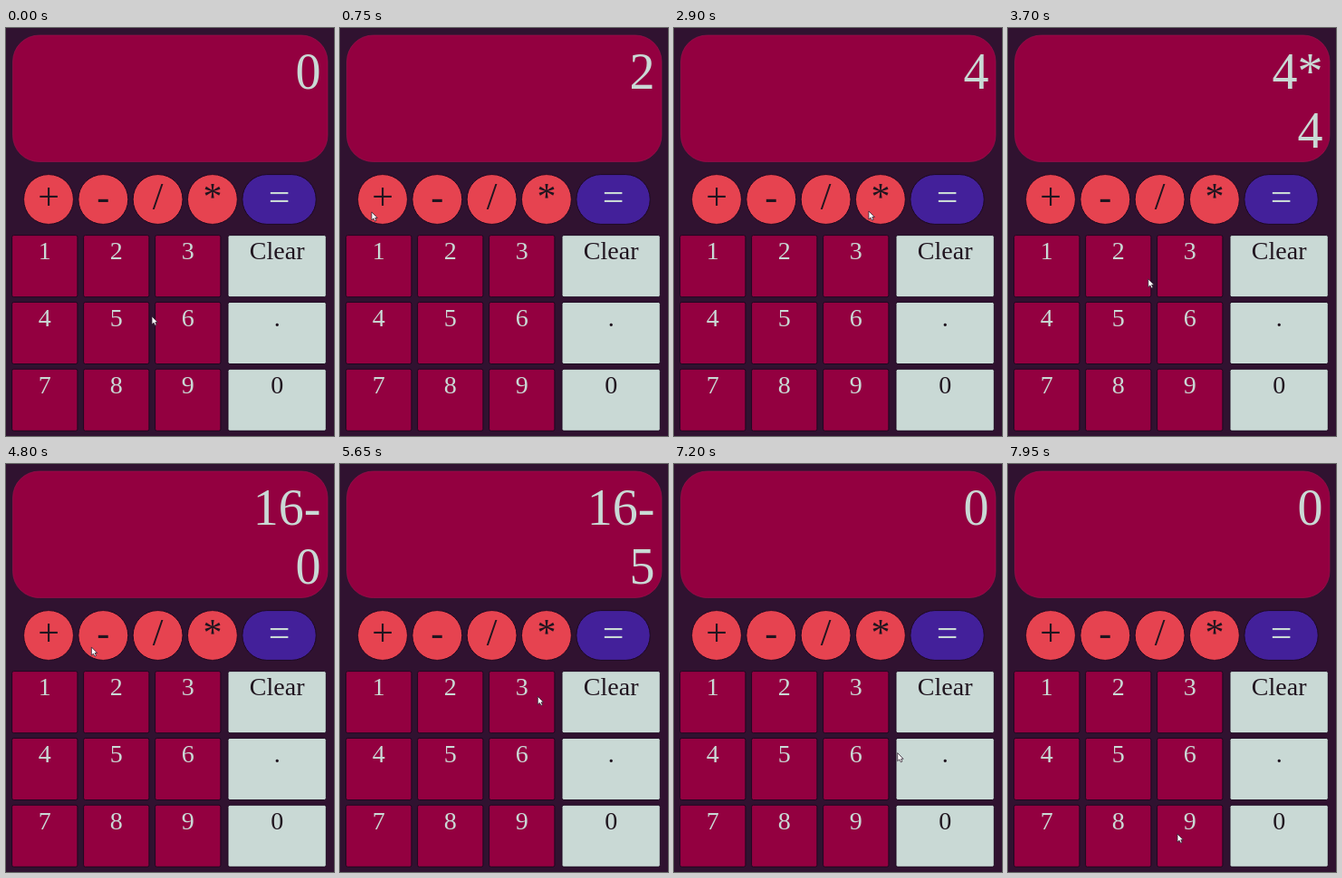
Animation of 362 by 450 pixels, one loop 8000 ms. Source, as an HTML page:

```html
<!DOCTYPE html>
<html lang="en">
<head>
<meta charset="utf-8">
<title>Calculator</title>
<style>
  html, body { margin: 0; width: 100%; height: 100%; overflow: hidden; background: #301230; }
  svg { display: block; width: 100%; height: 100%; }
  text { font-family: "Liberation Serif", "Times New Roman", serif; font-size: 28px; text-anchor: middle; }
  .key { stroke: #1d0820; stroke-width: 1; }
  .light { fill: #c9d9d5; }
  .dark { fill: #20151f; }
  .op { font-size: 42px; }
  .readout { font-size: 56px; text-anchor: end; }
</style>
</head>
<body>
<svg viewBox="0 0 362 450">
  <rect width="362" height="450" fill="#301230"/>
  <rect x="7.5" y="8" width="347.5" height="139.5" rx="29" fill="#930040" stroke="#a3124e" stroke-width=".6"/>
  <text id="upper" class="readout light" x="347.5" y="67"></text>
  <text id="lower" class="readout light" x="347.5" y="131.5"></text>
  <g id="keys"></g>
  <path id="cursor" d="M0 0V9L2.1 7.2L3.6 10.2L5.2 9.4L3.8 6.6H6.4Z" fill="#fff" stroke="#302030" stroke-width=".8"/>
</svg>
<script>
  const LOOP = 8000;
  const REST = 80; // pointer stands still this long on both sides of a press
  const PLUM = '#930040', CORAL = '#e64350', VIOLET = '#43209a', MINT = '#c9d9d5';
  const byId = id => document.getElementById(id);
  const aims = {};

  function add(tag, attrs, label = '') {
    const node = document.createElementNS('http://www.w3.org/2000/svg', tag);
    for (const name in attrs) node.setAttribute(name, attrs[name]);
    node.textContent = label;
    byId('keys').append(node);
  }

  function key(label, x, y, width, height, rx, fill, textClass, baseline) {
    const center = x + width / 2;
    add('rect', { x: x - .4, y: y - .4, width: width + .8, height: height + .8, rx, fill, class: 'key' });
    add('text', { x: center, y: y + baseline, class: textClass }, label);
    aims[label] = [center - width * .24, y + height * .74];
  }

  const roundKey = (label, x, width, fill, tone) =>
    key(label, x, 162, width, 54, 27, fill, `op ${tone}`, 38.3);
  const gridKey = (label, x, row, width, fill, tone) =>
    key(label, x, 229 + row * 73.8, width, 67.3, 2, fill, tone, 26.3);

  ['+', '-', '/', '*'].forEach((label, i) => roundKey(label, 20 + i * 60.3, 54, CORAL, 'dark'));
  roundKey('=', 261.3, 80.5, VIOLET, 'light');
  ['Clear', '.', '0'].forEach((label, row) => {
    for (let col = 0; col < 3; col++) {
      gridKey(row * 3 + col + 1, 7 + col * 79, row, 71.5, PLUM, 'light');
    }
    gridKey(label, 245.4, row, 107.5, MINT, 'dark');
  });

  const presses = [
    ['2', 400], ['+', 850], ['2', 1250], ['=', 1720], ['*', 2980], ['4', 3400],
    ['=', 4000], ['-', 4740], ['5', 5250], ['=', 5950], ['Clear', 6700]
  ].map(([label, time]) => ({ label, time, point: aims[label] }));

  const stops = [
    { time: -REST, point: [161, 318] },
    ...presses,
    { time: LOOP, point: [187, 408] }
  ];

  const compute = {
    '+': (a, b) => a + b,
    '-': (a, b) => a - b,
    '*': (a, b) => a * b,
    '/': (a, b) => a / b
  };
  const blank = { total: 0, op: '', entry: 0 };

  function press({ total, op, entry }, { label }) {
    if (label === 'Clear') return blank;
    if (label === '=') return { ...blank, entry: compute[op](total, entry) };
    if (label in compute) return { total: entry, op: label, entry: 0 };
    return { total, op, entry: entry * 10 + Number(label) };
  }

  function pointerAt(t) {
    const next = stops.findIndex(stop => stop.time > t);
    const from = stops[next - 1], to = stops[next];
    const start = from.time + REST, end = to.time - REST;
    const u = Math.min(1, Math.max(0, (t - start) / (end - start)));
    const ease = u * u * (3 - 2 * u);
    return from.point.map((v, axis) => v + (to.point[axis] - v) * ease);
  }

  function draw() {
    const t = performance.now() % LOOP;
    const { total, op, entry } = presses.filter(p => p.time <= t).reduce(press, blank);
    byId('upper').textContent = op ? total + op : entry;
    byId('lower').textContent = op ? entry : '';
    byId('cursor').setAttribute('transform', `translate(${pointerAt(t)})`);
    requestAnimationFrame(draw);
  }
  draw();
</script>
</body>
</html>
```
